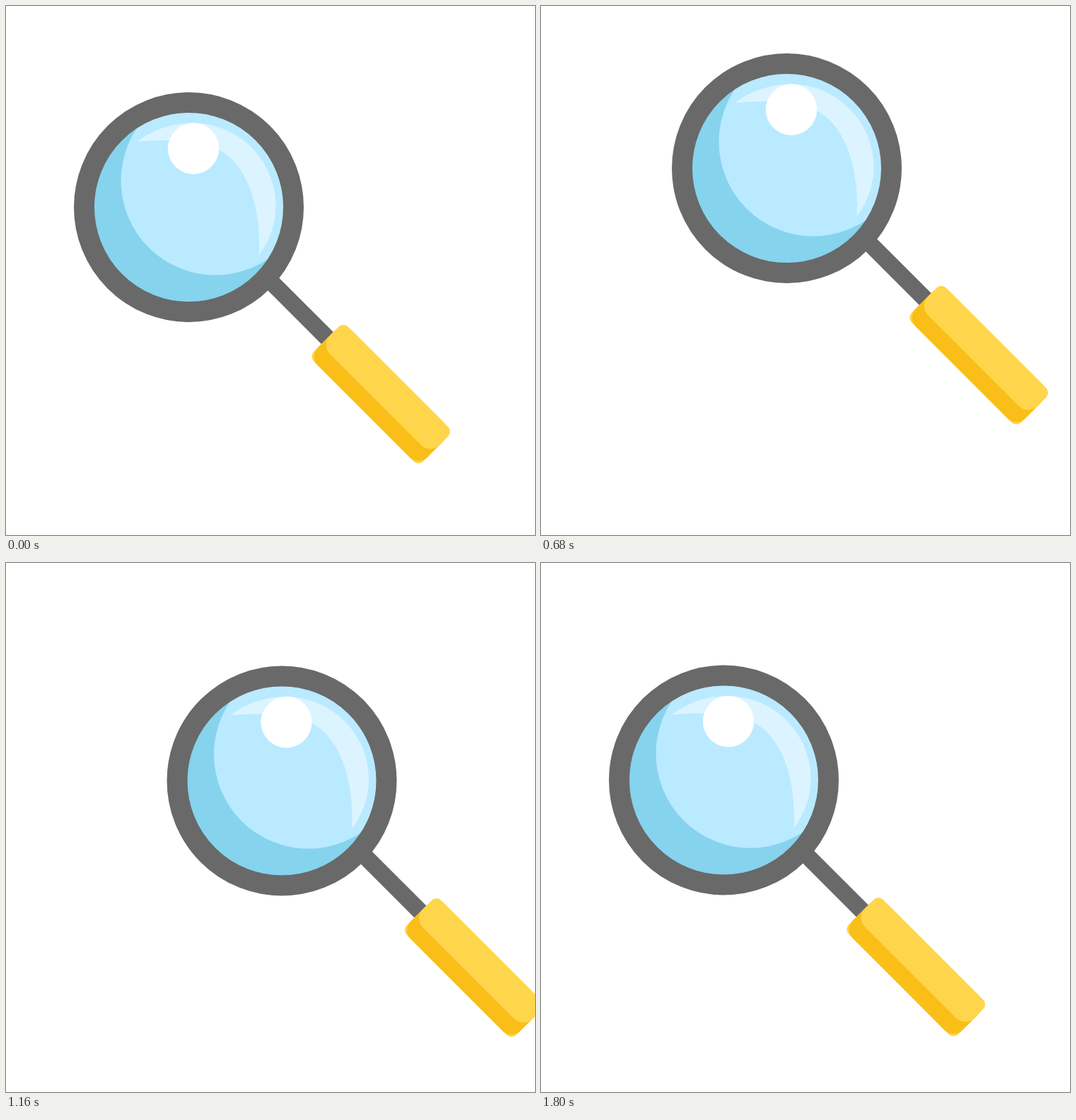
Write an HTML page that moves like this. It is 748x748 px and loops after 2000 ms.

```html
<!DOCTYPE html>
<html lang="en">
<head>
<meta charset="utf-8">
<title>Magnifying glass</title>
<style>
  html, body { margin: 0; width: 100%; height: 100%; overflow: hidden; background: #fff; }
  svg { display: block; width: 100vw; height: 100vh; }
</style>
</head>
<body>
<svg viewBox="0 0 748 748">
  <defs>
    <clipPath id="lens"><circle cx="258.5" cy="284.5" r="134"/></clipPath>
  </defs>
  <g id="glass">
    <g transform="rotate(45)">
      <rect x="535" y="-1.2" width="125" height="23.8" fill="#696969"/>
      <rect x="653.3" y="-21.4" width="219.1" height="69" rx="9.7" fill="#ffd54b"/>
      <rect x="653.3" y="-15" width="219.1" height="62.6" rx="17.5" fill="#f9bf18"/>
      <rect x="653.3" y="-21.4" width="219.1" height="45.4" rx="18.5" fill="#ffd54b"/>
    </g>
    <circle cx="258.5" cy="284.5" r="135" fill="#86d3ed"/>
    <circle cx="296" cy="247" r="133.5" fill="#baeaff" clip-path="url(#lens)"/>
    <path fill="#dcf4ff" d="M185 192 Q220 166 264 165.5 A117.5 117.5 0 0 1 381.5 283
      C381.5 309 372 333 357.5 352.5 C361 285 342 225 301 203 C275 188.5 229 187.5 185 192Z"/>
    <circle cx="265" cy="201.5" r="36.2" fill="#fff"/>
    <circle cx="258.5" cy="284.5" r="148" fill="none" stroke="#696969" stroke-width="29"/>
  </g>
</svg>
<script>
  const LOOP = 2000, MOVE_END = 1800, STEP = 40;
  const glass = document.getElementById('glass');

  // Waypoints of the lens centre: time, x, y
  const path = [
    [0, 258.5, 284.5],
    [280, 283.5, 247.5],
    [560, 323.7, 229.5],
    [680, 347.5, 229.5],
    [1000, 397.5, 270.5],
    [1120, 394.5, 299.3],
    [1160, 390, 308],
    [1400, 342, 339.6],
    [1520, 315.5, 336],
    [1680, 282, 320],
    [1800, 258.5, 307]
  ];
  const last = path.length - 1;

  const slope = (i, axis) =>
    (path[i + 1][axis] - path[i][axis]) / (path[i + 1][0] - path[i][0]);

  function tangent(i, axis) {
    if (i === 0) return 2 * slope(0, axis) - tangent(1, axis);
    if (i === last) return 2 * slope(last - 1, axis) - tangent(last - 1, axis);
    const before = path[i][0] - path[i - 1][0];
    const after = path[i + 1][0] - path[i][0];
    return (slope(i - 1, axis) * after + slope(i, axis) * before) / (before + after);
  }

  // Cubic Hermite interpolation along the waypoints
  function position(time, axis) {
    let i = 0;
    while (i < last - 1 && time >= path[i + 1][0]) i++;
    const span = path[i + 1][0] - path[i][0];
    const s = (time - path[i][0]) / span, r = 1 - s;
    return r * r * (1 + 2 * s) * path[i][axis]
      + s * s * (3 - 2 * s) * path[i + 1][axis]
      + span * s * r * (r * tangent(i, axis) - s * tangent(i + 1, axis));
  }

  function draw(ms) {
    const time = Math.min(Math.floor((ms % LOOP) / STEP) * STEP, MOVE_END);
    const dx = position(time, 1) - path[0][1];
    const dy = position(time, 2) - path[0][2];
    glass.setAttribute('transform', `translate(${dx.toFixed(2)} ${dy.toFixed(2)})`);
  }

  const start = performance.now();
  function tick() {
    draw(performance.now() - start);
    requestAnimationFrame(tick);
  }
  tick();
</script>
</body>
</html>
```
